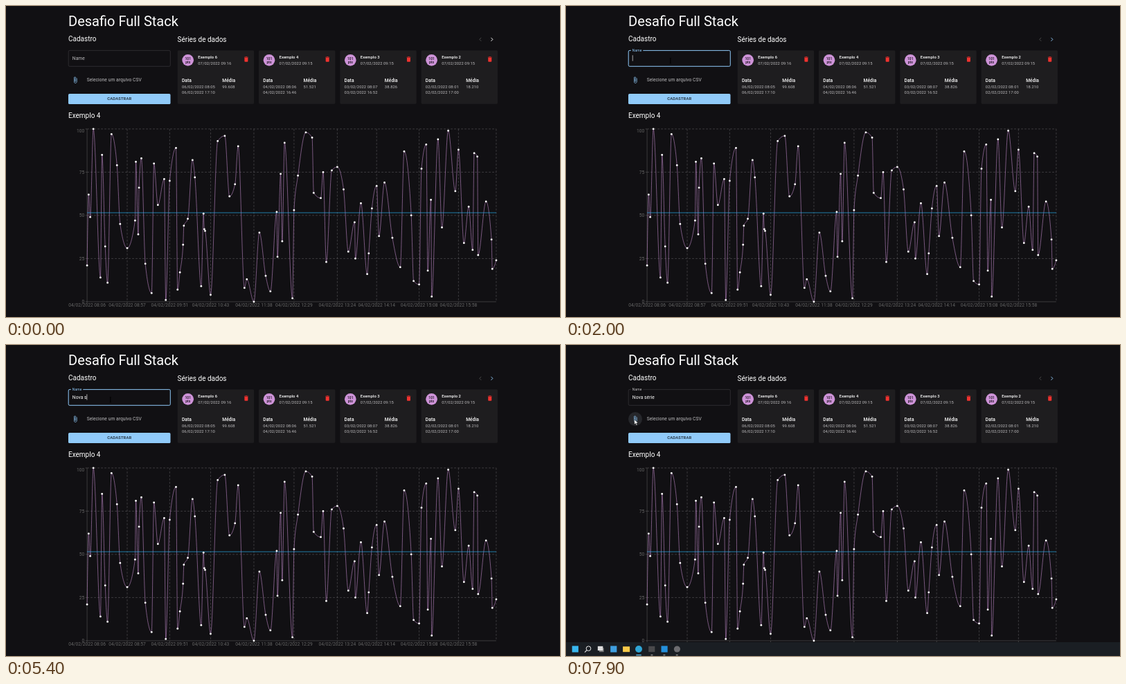
An HTML page for the animation above (8 s loop, 800x450 px).

```html
<!DOCTYPE html>
<html lang="pt">
<head>
<meta charset="utf-8">
<title>Desafio Full Stack</title>
<style>
  html, body { margin: 0; height: 100%; overflow: hidden; background: #111013; }
  svg { display: block; width: 800px; height: 450px; }
  text { font: 16px Roboto, sans-serif; letter-spacing: .00938em; fill: #fff; white-space: pre; }
  .h3 { font-size: 48px; letter-spacing: 0; }
  .h5 { font-size: 24px; letter-spacing: 0; }
  .small { font-size: 14px; letter-spacing: .01071em; }
  .bold { font-weight: 500; }
  .soft { fill: #bdbcbe; }
  .pts { font-size: 12px; font-weight: 500; fill: #17121a; text-anchor: middle; letter-spacing: 0; }
  .tick { fill: #666; letter-spacing: 0; }
  .button { font-size: 14px; font-weight: 500; letter-spacing: .02857em; fill: #16202a; text-anchor: middle; }
  .grid { stroke: #77757a; stroke-dasharray: 7 5; fill: none; }
  .axis { stroke: #777; fill: none; }
</style>
</head>
<body>
<!-- Laid out at 1920 x 1080 and shown at 800 x 450 -->
<svg id="stage" viewBox="0 0 1920 1080"></svg>
<script>
const LOOP = 8000, BLUE = '#90caf9', PURPLE = '#ce93d8', BG = '#111013';

// Minutes after 08:06 and the value measured at each
const minutes = [0, 2, 4, 8, 17, 19, 23, 26, 31, 38, 42, 51, 61, 62, 65, 66, 69, 74, 82, 85,
  90, 98, 100, 105, 113, 115, 118, 122, 123, 128, 134, 137, 145, 148, 149, 150, 157, 166, 175, 181,
  188, 192, 200, 203, 212, 219, 227, 233, 241, 242, 246, 248, 251, 261, 263, 268, 278, 286, 288, 297,
  300, 304, 311, 318, 326, 332, 340, 341, 348, 356, 358, 362, 368, 371, 378, 388, 398, 403, 412, 415,
  422, 425, 431, 433, 437, 438, 446, 451, 459, 468, 472, 479, 485, 490, 492, 496, 497, 507, 514, 515, 520];
const values = [21, 62, 49, 100, 14, 85, 32, 11, 97, 79, 45, 31, 47, 81, 39, 66, 83, 22, 5, 80,
  56, 71, 1, 70, 89, 7, 17, 33, 44, 48, 82, 72, 9, 51, 42, 41, 4, 93, 96, 61,
  68, 90, 8, 13, 0, 40, 15, 6, 52, 26, 74, 35, 92, 2, 53, 73, 98, 95, 63, 60,
  75, 23, 76, 78, 65, 29, 46, 25, 57, 16, 28, 54, 67, 38, 69, 37, 20, 87, 50, 12,
  10, 77, 91, 18, 59, 3, 94, 43, 99, 64, 88, 34, 55, 30, 86, 84, 27, 58, 36, 19, 24];
const ticks = [0, 51, 105, 157, 212, 263, 318, 368, 422, 472];

const cards = [
  ['Exemplo 6', '07/02/2022 09:16', '06/02/2022 08:05', '06/02/2022 17:10', '99.608'],
  ['Exemplo 4', '07/02/2022 09:15', '04/02/2022 08:06', '04/02/2022 16:46', '51.521'],
  ['Exemplo 3', '07/02/2022 09:15', '03/02/2022 08:07', '03/02/2022 16:52', '38.826'],
  ['Exemplo 2', '07/02/2022 09:15', '02/02/2022 08:01', '02/02/2022 17:00', '18.210']
];

const text = (x, y, s, cls = '', more = '') => `<text x="${x}" y="${y}" class="${cls}" ${more}>${s}</text>`;
const rect = (x, y, w, h, fill, more = '') =>
  `<rect x="${x}" y="${y}" width="${w}" height="${h}" fill="${fill}" ${more}/>`;
const circle = (x, y, r, fill, more = '') => `<circle cx="${x}" cy="${y}" r="${r}" fill="${fill}" ${more}/>`;
const path = (d, more) => `<path d="${d}" ${more}/>`;

const px = m => 281 + m * 1418 / 520;
const py = v => 1027 - v * 6;

// Monotone cubic through the points
function curve(xs, ys) {
  const n = xs.length;
  const slope = i => (ys[i + 1] - ys[i]) / (xs[i + 1] - xs[i]);
  const tan = xs.map((x, i) => {
    if (i == 0 || i == n - 1) return null;
    const a = slope(i - 1), b = slope(i), h = x - xs[i - 1], k = xs[i + 1] - x;
    const p = (a * k + b * h) / (h + k);
    return (Math.sign(a) + Math.sign(b)) * Math.min(Math.abs(a), Math.abs(b), Math.abs(p) / 2);
  });
  tan[0] = (3 * slope(0) - tan[1]) / 2;
  tan[n - 1] = (3 * slope(n - 2) - tan[n - 2]) / 2;
  let d = `M${xs[0]} ${ys[0]}`;
  for (let i = 1; i < n; i++) {
    const h = (xs[i] - xs[i - 1]) / 3;
    d += `C${xs[i - 1] + h} ${ys[i - 1] + h * tan[i - 1]} ${xs[i] - h} ${ys[i] - h * tan[i]} ${xs[i]} ${ys[i]}`;
  }
  return d;
}

function clock(m) {
  const all = 486 + m, two = n => String(n).padStart(2, '0');
  return `04/02/2022 ${two(Math.floor(all / 60))}:${two(all % 60)}`;
}

function chart() {
  const xs = minutes.map(px), ys = values.map(py), levels = [0, 25, 50, 75, 100];
  let s = '';
  for (const v of levels.slice(1)) s += path(`M281 ${py(v)}H1699`, 'class="grid"');
  for (const m of [...ticks.slice(1), 520]) s += path(`M${px(m)} 427V1027`, 'class="grid"');
  s += path('M281 427V1027H1699', 'class="axis"');
  for (const v of levels) {
    s += path(`M275 ${py(v)}h6`, 'class="axis"');
    s += text(272, py(v) + (v == 100 ? 13 : 6), v, 'tick', 'text-anchor="end"');
  }
  for (const m of ticks) {
    s += path(`M${px(m)} 1027v6`, 'class="axis"');
    s += text(px(m), 1045, clock(m), 'tick', 'text-anchor="middle"');
  }
  s += path(curve(xs, ys), `fill="none" stroke="${PURPLE}" stroke-width="1.3"`);
  s += path(`M281 ${py(51.521)}H1699`, 'stroke="#29b6f6" stroke-width="1.6"');
  return s + xs.map((x, i) => circle(x, ys[i], 3.4, '#fff')).join('');
}

function card([name, made, from, to, mean], i) {
  const trash = 'M6 19c0 1.1.9 2 2 2h8c1.1 0 2-.9 2-2V7H6zM19 4h-3.5l-1-1h-5l-1 1H5v2h14z';
  return `<g transform="translate(${594.5 + 281.5 * i} 154)">` +
    rect(0, 0, 265, 186, '#1e1d1f', 'rx="4"') +
    circle(36, 34, 20, PURPLE) + text(36, 34, '101', 'pts') + text(36, 46, 'pts', 'pts') +
    text(71, 29, name, 'small bold') + text(71, 49, made, 'small soft') +
    path(trash, 'transform="translate(226 19)" fill="#f0322f"') +
    text(15, 109, 'Data', 'bold') + text(155, 109, 'Média', 'bold') +
    text(15, 131, from, 'small soft') + text(15, 151, to, 'small soft') +
    text(155, 131, mean, 'small soft') + '</g>';
}

function form() {
  const clip = 'M16.5 6v11.5c0 2.21-1.79 4-4 4s-4-1.79-4-4V5c0-1.38 1.12-2.5 2.5-2.5s2.5 1.12 2.5 2.5v10.5' +
    'c0 .55-.45 1-1 1s-1-.45-1-1V6H10v9.5c0 1.38 1.12 2.5 2.5 2.5s2.5-1.12 2.5-2.5V5c0-2.21-1.79-4-4-4' +
    'S7 2.79 7 5v12.5c0 3.04 2.46 5.5 5.5 5.5s5.5-2.46 5.5-5.5V6z';
  let waves = 'M271 188';
  for (let i = 0; i < 9; i++) waves += 'l2 2l2 -2';
  return rect(216.5, 154.5, 353, 55, 'none', 'id="field" rx="4"') +
    rect(225, 151, 42, 6, BG, 'id="notch"') +
    text(230, 187, 'Name', '', 'id="label"') +
    path(waves, 'id="waves" fill="none" stroke="#e02020" stroke-width="1.6"') +
    text(230, 187, '', '', 'id="typed"') +
    rect(0, 171, 1.5, 20, '#fff', 'id="caret"') +
    path('M359 181h2q1 0 1 2v14q0 2 -1 2h-2m6 0h-2q-1 0 -1 -2v-14q0 -2 1 -2h2',
      'id="beam" fill="none" stroke="#000" stroke-width="1.5"') +
    circle(240, 257, 24, '#26272b', 'id="halo"') +
    path(clip, `transform="translate(228 245)" fill="${BLUE}"`) +
    text(280, 262, 'Selecione um arquivo CSV', 'soft') +
    rect(216, 305, 354, 36, BLUE, 'rx="4"') +
    text(393, 327, 'CADASTRAR', 'button');
}

function taskbar() {
  const y = 1056;
  return '<g id="taskbar">' + rect(0, 1032, 1920, 48, '#1a1e23') +
    rect(21, y - 11, 22, 22, '#38b6ee') +
    circle(78, y - 2, 8, 'none', 'stroke="#eee" stroke-width="2.4"') +
    path(`M72 ${y + 4}l-7 7`, 'stroke="#eee" stroke-width="2.6"') +
    rect(115, y - 4, 16, 14, '#777') + rect(110, y - 10, 18, 15, '#ddd') +
    rect(154, y - 11, 22, 22, '#3f9fe0') +
    rect(197, y - 9, 24, 19, '#f7c948') +
    circle(252, y, 12, '#2fa5d5') + rect(243, 1075, 18, 3, '#63c3f2') +
    rect(286, y - 10, 22, 20, '#4a4a4c') + rect(294, 1075, 7, 3, '#999') +
    rect(330, y - 11, 22, 22, '#2490dc') + rect(337, 1075, 7, 3, '#999') +
    circle(385, y, 11, '#6c6c70') + rect(381, 1075, 7, 3, '#999') + '</g>';
}

document.getElementById('stage').innerHTML = rect(0, 0, 1920, 1080, BG) +
  text(216, 69, 'Desafio Full Stack', 'h3') +
  text(216, 122, 'Cadastro', 'h5') +
  text(594, 125, 'Séries de dados', 'h5') +
  text(216, 389, 'Exemplo 4', 'h5') +
  path('M1647 110l-6 6l6 6', 'fill="none" stroke="#555" stroke-width="2"') +
  path('M1681 110l6 6l-6 6', 'id="next" fill="none" stroke-width="2.2"') +
  form() + cards.map(card).join('') + chart() + taskbar() +
  path('M0 0V17l4 -4l3 7l3 -1.5l-3 -6.5h6z', 'id="arrow" fill="#fff" stroke="#000"');

const FOCUS = 740, BLUR = 7600;
const keys = [
  [FOCUS, ''], [3200, 'N'], [3400, 'No'], [3500, 'Nov'], [4000, 'Nova'], [4300, 'Nova '],
  [4500, 'Nova s'], [4600, 'Nova s;'], [4700, 'Nova s;e'], [4800, 'Nova s;er'],
  [5200, 'Nova s;e'], [5300, 'Nova s;'], [5400, 'Nova s'],
  [6000, 'Nova sé'], [6200, 'Nova sér'], [6400, 'Nova séri'], [6500, 'Nova série']
];

const part = id => document.getElementById(id);
const set = (id, attrs) => { for (const k in attrs) part(id).setAttribute(k, attrs[k]); };
const show = (id, on) => set(id, { visibility: on ? 'visible' : 'hidden' });
const ramp = (t, a, b) => Math.min(1, Math.max(0, (t - a) / (b - a)));
const mix = (a, b, p) => a + (b - a) * p;

function draw(t) {
  const focused = t >= FOCUS && t < BLUR, hover = t >= 300 && t < FOCUS;
  set('field', { stroke: focused ? BLUE : hover ? '#fff' : '#48474a', 'stroke-width': focused ? 2.4 : 1.2 });

  const up = 1 - (1 - ramp(t, FOCUS, FOCUS + 200)) ** 3;
  set('label', { y: mix(187, 158, up) });
  part('label').style.fontSize = mix(16, 12, up) + 'px';
  part('label').style.fill = focused ? BLUE : '#bdbcbe';
  show('notch', up > .5);

  const [since, typed] = keys.findLast(k => k[0] <= t) || [0, ''];
  part('typed').textContent = typed;
  set('caret', { x: 230 + (typed ? part('typed').getComputedTextLength() : 0) });
  show('caret', focused && Math.floor((t - since) / 530) % 2 == 0);
  show('waves', t >= 7000 && t < BLUR);

  set('next', { stroke: t < 1800 ? '#fff' : BLUE });
  show('beam', t >= 500 && t < 7300);
  show('arrow', t >= 7300);
  const down = ramp(t, 7300, 7500), left = ramp(t, 7500, 7700);
  set('arrow', { transform: `translate(${mix(mix(362, 267, down), 237, left)} ${mix(190, 259, down)})` });
  show('halo', t >= BLUR);
  show('taskbar', t >= 7800);
}

const start = performance.now();
function tick() {
  draw((performance.now() - start) % LOOP);
  requestAnimationFrame(tick);
}
tick();
</script>
</body>
</html>
```
